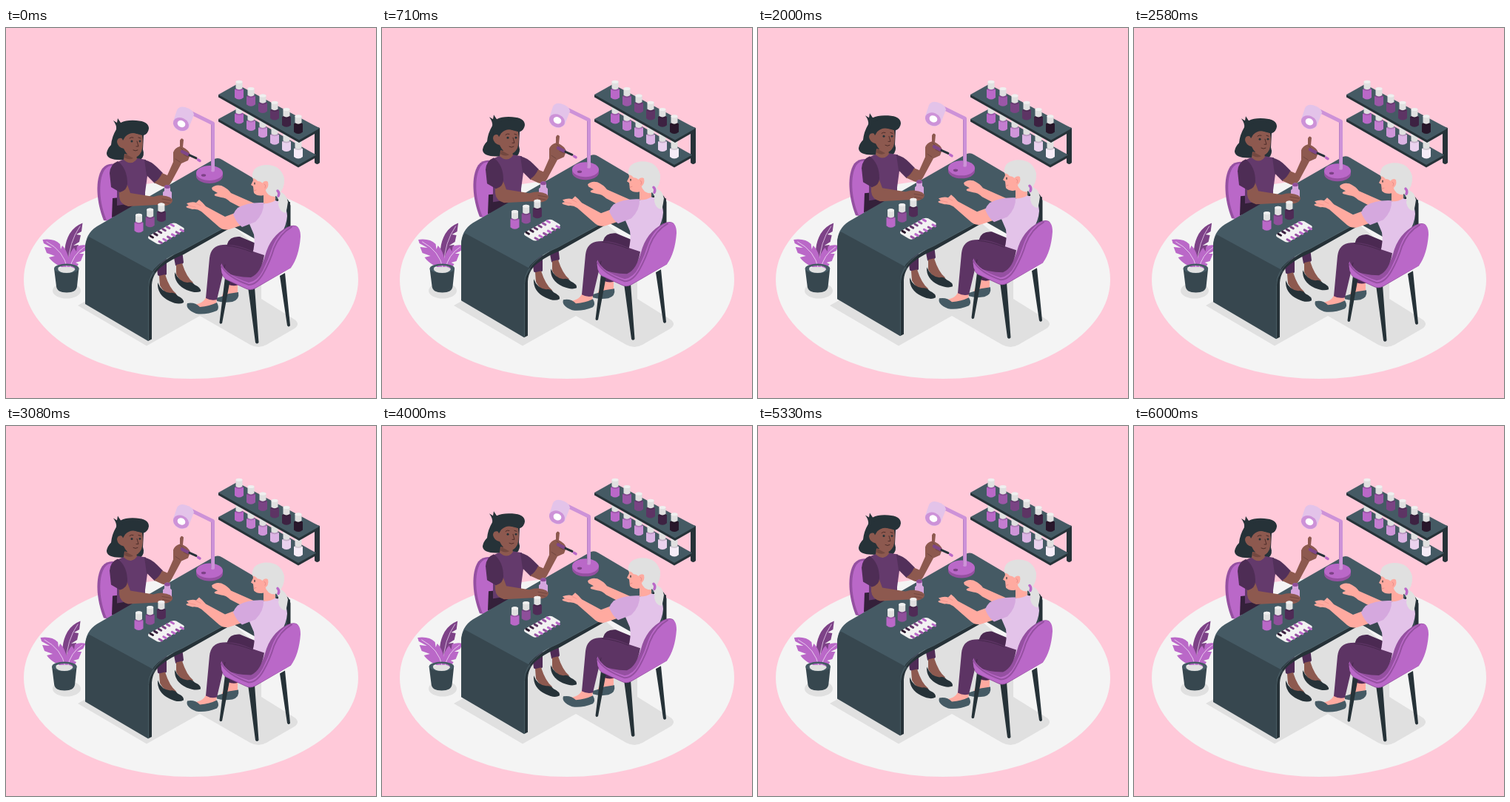
Animation, 500 px wide and 500 px high, one loop 6040 ms. Source, as an HTML page:

```html
<!DOCTYPE html>
<html lang="en">
<head>
<meta charset="utf-8">
<title>Manicure salon</title>
<style>
html, body { margin: 0; width: 100%; height: 100%; overflow: hidden; background: #ffc9d9; }
svg { display: block; width: 100vw; height: 100vh; }
.line { fill: none; stroke-linecap: round; stroke-linejoin: round; }
</style>
</head>
<body>
<svg viewBox="0 0 500 500">
  <ellipse cx="250" cy="340" rx="226" ry="134" fill="#f4f4f4"/>
  <g fill="#e0e0e0">
    <path d="M97 375L190 429.500L262 389L330 428Q341 434 352 428L390 406Q398 400 390 394L345 366L345 300L300 262L213 310Z"/>
    <ellipse cx="82" cy="355" rx="19" ry="10.500"/>
  </g>

  <g id="shelf">
    <path d="M417 138L424 135V182Q420.500 186 417 182Z" fill="#263238"/>
    <path d="M287 123V126.500L395 188.500L419 175V171Z" fill="#263238"/>
    <path d="M287 123L311 110L419 171.500L395 185Z" fill="#455a64"/>
    <g id="lowRow"></g>
    <path d="M287 90V93.500L396 155L424 139V135Z" fill="#263238"/>
    <path d="M287 90L312 76L424 135.500L396 151.500Z" fill="#455a64"/>
    <g id="topRow"></g>
  </g>

  <g id="plant">
    <path fill="#7d4287" d="M82 323C77 306 79 290 86 278Q92 268 103.500 263.500L102 275L95 279L101 280L99 289L91 294L98 293L95 306L88 324Z"/>
    <path class="line" stroke="#e9cfee" stroke-width=".8" d="M84 320Q85 289 100 268"/>
    <path fill="#ba68c8" d="M81 327C73 321 64 319 58 310L66 308L55 304L52 296L62 297L51 291L49.500 286Q65 284 73 292L74 299L76 294Q86 304 86 326Z"/>
    <path class="line" stroke="#f3e1f6" stroke-width=".8" d="M83 325Q78 301 55 289"/>
    <path fill="#ba68c8" d="M84 328C82 312 87 302 92 297L95 302L96 295Q103 292 110.500 294L107 301L99 305L105 305L101 315L94 317L98 319Q95 325 88 328Z"/>
    <path class="line" stroke="#f3e1f6" stroke-width=".8" d="M86 326Q90 306 106 296"/>
    <path fill="#37474f" d="M65 325L68 349Q69 357.500 82 357.500Q95 357.500 96 349L98.500 325Z"/>
    <path fill="#455a64" fill-rule="evenodd" d="M65 325a16.800 6.500 0 0 0 33.600 0a16.800 6.500 0 0 0-33.600 0M70 325.500a11.800 4.600 0 0 1 23.600 0a11.800 4.600 0 0 1-23.600 0"/>
    <path fill="#e0e0e0" d="M70 326Q74 322 82 323Q90 322 93.600 326Q91 331 82 331Q72 331 70 326"/>
  </g>

  <g id="scene">
    <!-- manicurist's chair and legs -->
    <path fill="#9550a1" d="M132 260C122 235 120 205 130 190Q137 182 148 184V262Z"/>
    <path fill="#ba68c8" d="M136 260C126 237 124 207 133 192Q139 184 150 186V262Z"/>
    <path fill="#4f2b56" d="M203 316L205 334Q210 338 217 333V308ZM225 300L229 321Q235 323 240 317L237 292Z"/>
    <path fill="#8d594f" d="M207 335L208 348Q214 360 228 362L230 359Q221 352 215 333ZM230 320L230 333Q238 347 250 347L253 344Q244 337 238 318Z"/>
    <path fill="#263238" d="M205 344Q210 357 222 358Q228 357 232 362Q241 366 240 371Q233 375 221 369Q204 361 205 344ZM228 330Q234 343 245 344Q251 342 255 347Q264 351 263 356Q256 359 244 354Q227 346 228 330Z"/>

    <!-- manicurist -->
    <path fill="#34203a" d="M144 230L184 226L186 245L143 256Z"/>
    <path fill="#263238" d="M145 125L150 128L151 122L155 128Q163 124 176 125Q193 126 193 136Q192 143 186 145L185 164Q188 173 182 178L168 179L150 178Q136 177 136 169Q137 163 142 158Q143 147 149 137Q150 132 145 125Z"/>
    <path fill="#643a6c" d="M151 181L160 177Q169 187 177 176L189 178L191 200L188 222L188 234L150 240L150 205Z"/>
    <path fill="#8d594f" d="M160 170L176 172L177 177Q169 187 159 178Z"/>
    <path fill="#734840" d="M161 170L172 176Q166 179 160 175Z"/>
    <path fill="#8d594f" d="M157 149Q161 140 171 141L184 145Q186 158 183 167Q179 175 173 175Q164 174 159 163Q151 161 150 154Q150 148 157 149Z"/>
    <path fill="#263238" d="M150 148Q151 130 172 129Q185 129 190 138Q186 145 177 143Q168 140 161 147L158 152Q156 146 150 148Z"/>
    <g fill="#263238"><circle cx="170" cy="153" r="1.500"/><circle cx="181" cy="153" r="1.400"/></g>
    <path class="line" stroke="#4d2d2a" stroke-width="1" d="M167 149Q169 147 172 148M179 148L182 149M177 153L179 160L176 160M172 165Q175 167 178 165"/>
    <path fill="#52305a" d="M187 178Q196 180 204 188L212 196Q208 205 201 210L190 199Z"/>
    <path fill="#8d594f" d="M200 209Q207 205 211 196L218 199L226 181L226 168Q228 162 235 160L235 152Q237 147 240 151L239 161Q247 165 249 171L246 179L237 183L223 209Q218 217 211 214Z"/>
    <path class="line" stroke="#704640" stroke-width="1" d="M229 177L235 181M236 162L240 166M240 171L246 174"/>

    <!-- desk -->
    <path fill="#37474f" d="M296 262L384 312V235H300Z"/>
    <path fill="#263238" d="M192 423L197 420.500V347Q198 330 214 320Q223 313 240 306L376 229Q380 233 380 242V310L384.500 308V240Q383 231 373 226L238 299L190 330Z"/>
    <path fill="#455a64" d="M107 298Q107 278 123 268L280 178Q286 174 292 178L375 227L238 301Q212 312 200 326L194 337Z"/>
    <path fill="#37474f" d="M107 373V298Q107 288 112 282L202 331Q193 339 192 350V423Z"/>
    <path class="line" stroke="#52676f" stroke-width=".8" d="M192.500 422V350Q193 332 210 318Q221 308 238 301L300 267"/>

    <!-- resting arm and open bottle -->
    <path fill="#8d594f" d="M153 216L164 212L168 223L199 228Q205 226 212 226L221 227Q226 230 224 235Q220 241 212 240L203 239L165 241Q154 238 153 228Z"/>
    <path fill="#4e2d55" d="M151 180Q141 184 140 196L142 215L154 222Q164 219 164 210Q164 190 151 180Z"/>
    <path fill="#d5a5de" d="M214 214Q218 210 222 214L222 220L224 222V232Q218 230 212 229V222L214 220Z"/>
    <ellipse cx="218" cy="214.500" rx="4" ry="2.500" fill="#8e4f9a"/>
    <path fill="#8d594f" d="M203 229Q212 224 222 229Q227 233 223 237Q216 242 205 238Z"/>
    <path class="line" stroke="#704640" stroke-width=".9" d="M211 231L223 233M212 235L221 237"/>

    <!-- brush -->
    <path class="line" stroke="#7e4688" stroke-width="4.500" d="M238 167L246 171"/>
    <path class="line" stroke="#263238" stroke-width="3" d="M248 172L257 176"/>
    <path class="line" stroke="#ba68c8" stroke-width="3.500" d="M259.500 178L262 179.500"/>

    <!-- lamp -->
    <path fill="#9550a1" d="M257 196v4a18 10 0 0 0 36 0v-4z"/>
    <ellipse cx="275" cy="196" rx="18" ry="10" fill="#ba68c8"/>
    <ellipse cx="267" cy="199" rx="3.200" ry="1.800" fill="#7d4287"/>
    <path class="line" stroke="#cd92d8" stroke-width="5" d="M251 115L279.500 129V192"/>
    <path class="line" stroke="#b77fc3" stroke-width="1" d="M277.500 131V192"/>
    <path fill="#e3c3e9" d="M226 126L231 111Q234 105 242 107Q253 110 254 117L247 135Q242 141 234 139Q225 135 226 126Z"/>
    <ellipse cx="236.500" cy="130" rx="11" ry="8.500" transform="rotate(24 236.500 130)" fill="#cd92d8"/>
    <ellipse cx="237" cy="129.500" rx="5.500" ry="4.500" transform="rotate(24 237 129.500)" fill="#fff"/>

    <!-- swatch card -->
    <path fill="#f2f2f2" d="M193 281L224 264Q227 263 230 264L240 270Q242 272 239 274L209 292Q206 293 203 291L193 285Q191 283 193 281Z"/>
    <g id="swatches"></g>
    <g id="deskRow"></g>

    <!-- client: far arm, legs and shoes -->
    <path fill="#ffaaa0" d="M278 216Q283 211 291 213Q300 217 304 223L338 238L328 248L303 235Q297 229 291 229L283 227Q279 225 286 223L279 219Z"/>
    <path fill="#ffaaa0" d="M300 343H313V360L291 364Z"/>
    <path fill="#455a64" d="M284 365Q292 363 301 359L314 357Q316 367 306 370Q294 372 285 369Z"/>
    <path fill="#4b2952" d="M299 292Q302 281 316 282L340 292L337 306L315 310L314 347Q307 350 299 346Z"/>
    <path fill="#ffaaa0" d="M271 362H285L284 377L262 381L250 374Q267 374 271 362Z"/>
    <path fill="#455a64" d="M245 372Q255 370 262 377Q275 376 285 371Q289 378 285 382Q270 388 257 386Q242 380 245 372Z"/>

    <!-- client: head and torso -->
    <path fill="#ffaaa0" d="M333 199L334 206L331 212L334 214L335 223Q340 228 348 226L348 237Q357 242 364 235L364 205Z"/>
    <path fill="#e3c3e9" d="M344 237Q357 238 364 233Q379 237 380 254Q379 267 372 278L350 320L333 305Q337 292 335 279L329 265Z"/>
    <path fill="#e0e0e0" d="M333 203Q331 187 350 185Q371 184 376 203Q377 217 368 225L363 228Q353 228 350 217Q347 206 340 207Q337 203 333 203Z"/>
    <path fill="#e0e0e0" d="M367 220Q379 223 381 235Q380 243 378 250Q370 249 368 239Q370 231 364 226Z"/>
    <path class="line" stroke="#ba68c8" stroke-width="3.500" d="M367 220Q370 223 368 227"/>
    <path fill="#ffaaa0" d="M346 210Q350 205 354 208Q356 216 349 220L345 218Z"/>
    <path class="line" stroke="#e58b85" stroke-width=".9" d="M349 211Q352 212 350 216M335 220L338 219"/>
    <path class="line" stroke="#263238" stroke-width="1.200" d="M336 209V211"/>
    <path fill="#ffaaa0" d="M244 237Q252 234 257 236L261 232Q265 235 270 241L296 255L312 249L320 266L302 272Q294 274 288 269L264 248Q258 244 252 245L245 243Q241 241 247 240Z"/>
    <path class="line" stroke="#ef918a" stroke-width=".8" d="M247 240L256 242M257 237L263 240"/>
    <path fill="#d5a8de" d="M348 236Q327 235 313 243Q309 247 307 252Q311 263 319 269L337 262Q349 250 348 236Z"/>

    <!-- client: chair and near leg -->
    <path fill="#263238" d="M296 337L303 340L292 399Q289 401 288.500 398ZM327 350H336L341.500 425Q339 428 337 425ZM370 335L377 331L384 402Q382 405 380 402Z"/>
    <path fill="#9550a1" d="M291 319Q297 323 330 333Q344 329 350 308Q357 281 380 269Q391 264 395 270L385 324L337 352Q330 356 323 352L297 340Q289 334 291 319Z"/>
    <path fill="#5d3464" d="M293 293Q277 294 275 311L270 365Q277 369 285 367L294 329Q310 337 331 337Q345 331 349 307L334 302Q311 291 293 293Z"/>
    <path class="line" stroke="#43264a" stroke-width=".9" d="M298 294Q313 295 333 303M294 329L296 320"/>
    <path fill="#ba68c8" d="M291 318Q298 335 328 344Q340 342 347 328Q355 312 360 296Q368 276 383 269Q398 263 398 282Q396 309 385 324L337 351Q330 355 323 351L297 339Q289 333 291 318Z"/>
    <path class="line" stroke="#9550a1" stroke-width="2" d="M291 321Q299 337 328 347Q339 347 348 331Q357 315 362 298Q370 278 386 269"/>
  </g>
</svg>
<script>
const $ = id => document.getElementById(id);

// One nail polish bottle: x is its centre, y the top of its cap.
const bottle = (x, y, color) => `
  <path d="M${x - 6} ${y + 12}q6-4 12 0v11q-6 5-12 0z" fill="${color}"/>
  <path d="M${x - 6} ${y + 12}q6-4 12 0q-6 4-12 0z" fill="#000" opacity=".15"/>
  <path d="M${x - 4.5} ${y + 1.5}q4.500-3.500 9 0v9q-4.500 3.500-9 0z" fill="#e0e0e0"/>
  <ellipse cx="${x}" cy="${y + 1.8}" rx="4.500" ry="2" fill="#f0f0f0"/>`;

const row = (id, x, y, dx, dy, colors) =>
  $(id).innerHTML = colors.map((c, i) => bottle(x + dx * i, y + dy * i, c)).join('');

const darks = ['#ba68c8', '#9b57a7', '#7a4484', '#5d3464', '#3d2242', '#28172b'];
const lights = ['#ba68c8', '#c47dd0', '#cf95d9', '#dcb4e4', '#ead2ee', '#f6edf8'];
row('topRow', 315, 71, 16, 9.3, darks);
row('lowRow', 315, 104, 16, 9.4, lights);
row('deskRow', 179.5, 251, 15.2, -7.2, ['#ba68c8', '#8e4f9a', '#4f2b56']);

const nail = (x, y, color) =>
  `<path class="line" stroke="${color}" stroke-width="3" d="M${x} ${y}l3.500 2"/>`;
$('swatches').innerHTML = darks.map((c, i) =>
  nail(195 + 5.6 * i, 281 - 3.1 * i, darks[5 - i]) +
  nail(207 + 5.8 * i, 288.5 - 3.2 * i, i % 2 ? '#ba68c8' : '#9550a1')).join('');

// Horizontal shake: offsets at every tenth of the cycle.
const shake = [0, -1, 2, -4, 4, -4, 4, -4, 2, -1, 0];
const LOOP = 6040;

function draw(now) {
  const t = now % LOOP;
  const rise = 10 * (1 - Math.abs(1 - (t % 3000) / 1500));
  const k = (t % 6000) / 600, i = Math.floor(k);
  const sway = shake[i] + (shake[i + 1] - shake[i]) * (k - i);
  $('scene').setAttribute('transform', `translate(0 ${-rise})`);
  $('plant').setAttribute('transform', `translate(${sway} 0)`);
}

const start = performance.now();
function tick() {
  draw(performance.now() - start);
  requestAnimationFrame(tick);
}
tick();
</script>
</body>
</html>
```
